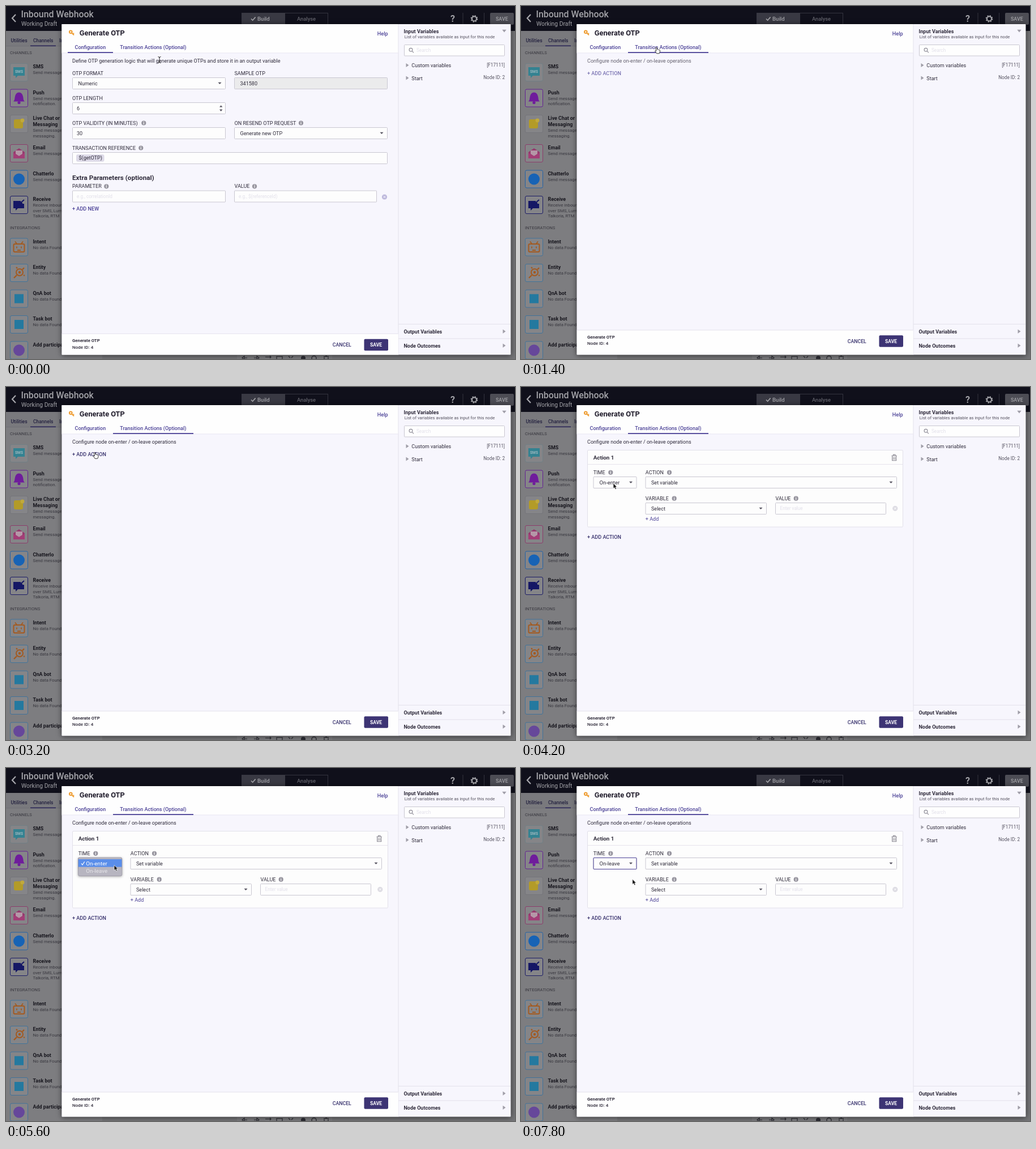
Recreate the animation shown at these times as an HTML page. Size 899x623 px, loop 8000 ms.

```html
<!DOCTYPE html>
<html lang="en">
<head>
<meta charset="utf-8">
<title>Generate OTP</title>
<style>
html, body { margin: 0; width: 100%; height: 100%; overflow: hidden; background: #747477; }
svg { display: block; font-family: Roboto, "Liberation Sans", sans-serif; }
text { white-space: pre; }
</style>
</head>
<body>
<svg id="stage" width="899" height="623" viewBox="0 0 899 623"></svg>
<script>
const INK = '#2f2b3a', PURPLE = '#4a4096', DEEP = '#352f6b', FAINT = '#e2e0ea', EDGE = '#c9c7d1';

const text = (x, y, s, size = 9.05, weight = 400, fill = INK, more = '') =>
  `<text x="${x}" y="${y}" font-size="${size}" font-weight="${weight}" fill="${fill}" ${more}>${s}</text>`;
const rect = (x, y, w, h, fill, stroke = 'none', rx = 0, more = '') =>
  `<rect x="${x}" y="${y}" width="${w}" height="${h}" fill="${fill}" stroke="${stroke}" rx="${rx}" ${more}/>`;
const path = (d, fill = 'none', stroke = 'none', width = 1, more = '') =>
  `<path d="${d}" fill="${fill}" stroke="${stroke}" stroke-width="${width}" ${more}/>`;
const circle = (x, y, r, fill, stroke = 'none', width = 1) =>
  `<circle cx="${x}" cy="${y}" r="${r}" fill="${fill}" stroke="${stroke}" stroke-width="${width}"/>`;
const group = (id, s) => `<g id="${id}">${s}</g>`;
const at = (x, y, s) => `<g transform="translate(${x} ${y})">${s}</g>`;

const info = (x, y) => circle(x, y, 4.1, '#97959f') +
  rect(x - .6, y - .8, 1.2, 3.2, '#fff') + circle(x, y - 2.1, .7, '#fff');
const label = (x, y, s, infoX) => text(x, y, s) + (infoX ? info(infoX, y - 3) : '');
const caret = (x, y) => path(`M${x - 3} ${y - 1.6}h6l-3 3.4z`, '#55525f');
const field = (x, y, w, s, fill = '#fdfdfd') =>
  rect(x + .5, y + .5, w - 1, 20, fill, EDGE, 1) + text(x + 10.5, y + 13.8, s);
const select = (x, y, w, s) => field(x, y, w, s) + caret(x + w - 10.5, y + 10.3);
const hint = (x, y, s) => text(x, y, s, 8.2, 400, FAINT);
const clear = (x, y, fill) => circle(x, y, 4.6, fill) +
  path(`M${x - 1.8} ${y - 1.8}l3.6 3.6m0 -3.6l-3.6 3.6`, 'none', '#fff', 1);

// Sidebar icons are drawn around the centre of their tile.
const glyph = {
  sms: path('M-10 -9h20v15h-12l-4 4v-4h-4z', '#348291') +
    text(0, 1, 'SMS', 6.6, 700, '#9fb9bf', 'text-anchor="middle"'),
  bell: path('M-10 6c3-3 2-6 3-9c1-4 3-7 7-7s6 3 7 7c1 3 0 6 3 9z', '#6f1c9c') + circle(0, 8, 2.6, '#6f1c9c'),
  chat: rect(-9, -8, 16, 16, '#b39b28', 'none', 3) + circle(6, -6, 3.4, '#c0a93c'),
  mail: path('M-10 -2l10-7l10 7v11h-20z', '#963a6e') + path('M-6 -5h12v6l-6 4l-6-4z', '#b597a7') +
    path('M-10 -1l10 6l10-6v10h-20z', '#a33e77'),
  ball: circle(0, 0, 10, '#1763b5'),
  receive: path('M-10 -7h12v5h7v8h-11l-4 4v-4h-4z', '#151765') +
    path('M9 -9l-7 6m0-4v4h4', 'none', '#151765', 2),
  bot: rect(-9.5, -5.5, 19, 14, 'none', '#a35a20', 2, 'stroke-width="2"') +
    path('M-7 -10l3 4m11-4l-3 4M-4 -1v3m8-3v3M-3 5.5h6', 'none', '#a35a20', 1.8),
  entity: circle(1, -1, 6, 'none', '#a35a20', 2) + circle(1, -1, 2.2, '#a35a20') +
    path('M-4 4l-5 5M6 -6l3-3M-3 -8l-2-2M8 4l2 1', 'none', '#a35a20', 2.4),
  block: rect(-8, -8, 16, 16, '#24799f'),
  disc: circle(0, 0, 10, '#66479a')
};

const items = [
  [117, 'sms', '#707f85', ['SMS'], ['Send message']],
  [162.5, 'bell', '#642092', ['Push'], ['Send message', 'notification.']],
  [208, 'chat', '#74747a', ['Live Chat or', 'Messaging'], ['Send message', 'messaging.']],
  [260, 'mail', '#8c3d6b', ['Email'], ['Send message']],
  [305.5, 'ball', '#2362a6', ['Chatterlo'], ['Send message']],
  [351, 'receive', '#1c1d66', ['Receive'], ['Receive inbound', 'over SMS, Lumo', 'Talkoria, RTM']],
  [425.5, 'bot', '#41739a', ['Intent'], ['No data Found']],
  [471, 'entity', '#41739a', ['Entity'], ['No data Found']],
  [516.5, 'block', '#41739a', ['QnA bot'], ['No data Found']],
  [562, 'block', '#41739a', ['Task bot'], ['No data Found']],
  [607.5, 'disc', '#41739a', ['Add participant'], []]
];
const item = ([y, icon, edge, names, notes]) => {
  const top = y - 6.8, below = top + (names.length - 1) * 11;
  return rect(7.5, y - 15.5, 31, 31, '#858588', edge, 2.5) + at(23, y, glyph[icon]) +
    names.map((s, i) => text(47.5, top + i * 11, s, 8.9, 600, '#17161d')).join('') +
    notes.map((s, i) => text(47.5, below + 10 + i * 9.4, s, 7.8, 400, '#38373e')).join('');
};

const backdrop = () => rect(0, 0, 899, 623, '#747477') + rect(0, 44, 170, 579, '#7d7d80') +
  rect(0, 44, 170, 27, '#79797d') + rect(0, 0, 899, 44, '#10101b') +
  path('M17 15l-6 6.5l6 6.5', 'none', '#a6a6ab', 2.2) +
  text(26.5, 19.5, 'Inbound Webhook', 15.9, 500, '#a3a3a8') +
  text(27, 35.2, 'Working Draft', 10.45, 400, '#a3a3a8') +
  rect(416.5, 12.5, 152, 20, 'none', '#34343f') + rect(416, 12, 77, 21, '#393943') +
  path('M433 22.5l2.6 2.7l5-5.6', 'none', '#a3a3a8', 1.6) +
  text(444, 25.8, 'Build', 9.6, 500, '#a3a3a8') + text(514, 25.8, 'Analyse', 9.4, 500, '#62626b') +
  text(785, 28.2, '?', 16, 700, '#a3a3a8') + rect(806.5, 12, 1, 21, '#34343f') + rect(844, 12, 1, 21, '#34343f') +
  circle(827, 22.5, 4, 'none', '#a3a3a8', 2) +
  `<circle cx="827" cy="22.5" r="5.4" fill="none" stroke="#a3a3a8" stroke-width="2" stroke-dasharray="2.24 2"/>` +
  rect(855, 12, 42, 21, '#4d4d55', 'none', 2) + text(865, 25.7, 'SAVE', 8.9, 500, '#a3a3a8') +
  text(8.5, 64, 'Utilities', 8.6, 500, '#23213f') + text(48, 64, 'Channels', 8.5, 500, '#23213f') +
  text(94, 64, 'Integrations', 8.5, 500, '#23213f') +
  rect(0, 70.5, 170, .7, '#6d6d72') + rect(43, 69.5, 45, 1.6, '#2c2758') +
  text(7, 85.4, 'CHANNELS', 7.5, 400, '#38373e') + text(7, 394.4, 'INTEGRATIONS', 7.75, 400, '#38373e') +
  items.map(item).join('') +
  rect(408, 615, 168, 8, '#7b7b7e') +
  path('M417 621l4-3v6zM447 621l-4-3v6zM421 621h5M438 621h5M458 619.5h10m-2-2l2 2l-2 2' +
    'M478 618.5h10v6h-10zM499 618l3 3m5-3l-3 3M561 618.5h9m-6-1h3m-5 2v4h7v-4', 'none', '#2c2c33', 1.2) +
  circle(525, 621.5, 4, '#2c2c33') + circle(544, 621.5, 4, 'none', '#2c2c33', 1.4);

const twisty = (x, y) => path(`M${x} ${y - 3.6}l5 3.6l-5 3.6z`, '#a09ea8');

const modal = () =>
  rect(98.5, 32, 793, 583.5, '#f7f6fd', 'none', 1, 'style="filter:drop-shadow(0 1px 5px #0009)"') +
  rect(98.5, 32, 594.5, 50.5, '#fefefe') + rect(98.5, 82.5, 594.5, 1, '#eceaf3') +
  // key
  circle(114.3, 45.8, 2.3, 'none', '#ee9a2c', 2) + path('M116 47.4l4 4m-1.7-2l1.8-1.6', 'none', '#ee9a2c', 1.8) +
  text(129.8, 52, 'Generate OTP', 12.8, 600, '#231f2e') +
  text(655.8, 52, 'Help', 9.1, 500, PURPLE) +
  text(121.5, 76.2, 'Configuration', 9, 500, PURPLE) +
  text(201.3, 76.2, 'Transition Actions (Optional)', 9.1, 500, PURPLE) +
  rect(109, 81.2, 80, 1.8, PURPLE, 'none', 0, 'id="underline"') +
  // variables panel
  rect(692.5, 32, 1, 583.5, '#e4e2ec') +
  text(702.5, 47.9, 'Input Variables', 9.15, 600) +
  text(703.7, 57.2, 'List of variables available as input for this node', 7.67, 400, '#55525f') +
  path('M876.3 41.8h7.4l-3.7 4.6z', '#a09ea8') +
  rect(703.5, 68.5, 177, 19.5, '#fefefe', EDGE, 1) +
  circle(715, 77.3, 2.9, 'none', '#8d8b96', 1.1) + path('M717.2 79.6l2.8 2.8', 'none', '#8d8b96', 1.2) +
  hint(725, 81.2, 'Search') +
  twisty(706.5, 104.5) + text(716.3, 108.2, 'Custom variables') +
  text(881, 106.8, '[F17111]', 8.2, 400, '#55525f', 'text-anchor="end"') +
  twisty(706.5, 127) + text(716.3, 130.6, 'Start') +
  text(881, 128.8, 'Node ID: 2', 8.2, 400, '#55525f', 'text-anchor="end"') +
  rect(693, 561, 198, 1, '#e4e2ec') + rect(693, 586.5, 198, 1, '#e4e2ec') +
  text(702.5, 577.9, 'Output Variables', 9, 600) + twisty(877.5, 574.3) +
  text(702.5, 603, 'Node Outcomes', 9, 600) + twisty(877.5, 599.3);

const footer = () => rect(98.5, 572, 594.3, 43.5, '#fefefe') + rect(98.5, 571.3, 594.3, 1.2, '#e8e6f0') +
  text(117, 586.6, 'Generate OTP', 7.8, 600) + text(117, 598, 'Node ID: 4', 8, 500) +
  text(576.7, 594.8, 'CANCEL', 8.75, 500, DEEP) +
  rect(632.5, 581.3, 42.5, 20.5, '#3d3474', 'none', 2) + text(643, 594.8, 'SAVE', 8.6, 700, '#fff');

const config = () =>
  text(117, 100.3, 'Define OTP generation logic that will generate unique OTPs and store it in an output variable') +
  label(117, 121.5, 'OTP FORMAT') + select(117, 126, 271, 'Numeric') +
  label(403.5, 121.5, 'SAMPLE OTP') + field(403, 126, 271, '341580', '#ebebec') +
  label(117, 165.5, 'OTP LENGTH') + field(117, 170, 271, '') + text(125, 183.8, '6') +
  path('M377 178.6h5.4l-2.7-3.4zM377 182.6h5.4l-2.7 3.4z', '#55525f') +
  label(117, 209.5, 'OTP VALIDITY (IN MINUTES)', 243.3) + field(117, 214, 271, '') + text(125, 227.8, '30') +
  label(403.5, 209.5, 'ON RESEND OTP REQUEST', 521) + select(403, 214, 271, 'Generate new OTP') +
  label(117, 253.5, 'TRANSACTION REFERENCE', 238.3) + field(117, 258, 557, '') +
  rect(124, 262, 49.5, 12.8, '#dddae8', 'none', 3) + text(128.5, 271.4, '$(getOTP)') +
  text(117, 306.8, 'Extra Parameters (optional)', 11.7, 600) +
  label(117, 321.3, 'PARAMETER', 177.3) + field(117, 325.5, 271, '') + hint(125, 339, 'e.g., correlationId') +
  label(403.5, 321.3, 'VALUE', 439) + field(403, 325.5, 252, '') + hint(411, 339, 'e.g., $(referenceId)') +
  clear(668.5, 337, '#bdb8dc') + text(117, 360.7, '+ ADD NEW', 9.1, 500, PURPLE);

const actions = () =>
  text(117, 100.3, 'Configure node on-enter / on-leave operations') +
  group('add', text(117, 121.6, '+ ADD ACTION', 9.05, 500, 'inherit'));

const card = () => rect(117.5, 111.5, 557, 135.5, '#fdfdfd', '#e2e0ea', 1.5) + rect(118, 136, 556, 1, '#e6e4ec') +
  text(127.7, 128.2, 'Action 1', 9.8, 600) +
  path('M654.5 121.2h9.4M657.5 120.7v-1.5h3.4v1.5M655.7 122v7.8h7v-7.8M657.9 123.5v4.7m2.6-4.7v4.7', 'none', '#85838d', 1.1) +
  label(127.7, 153.8, 'TIME', 158.3) + select(127.5, 158, 77, '') +
  `<text id="when" x="138.5" y="172.3" font-size="9.4" fill="${INK}"></text>` +
  group('focus', rect(128, 158.5, 76, 20, 'none', PURPLE, 1)) +
  label(219.8, 153.8, 'ACTION', 262) + select(219.5, 158, 444.5, 'Set variable') +
  label(219.8, 199.7, 'VARIABLE', 270.7) + select(219.5, 204, 214.5, 'Select') +
  label(449.5, 199.7, 'VALUE', 485.7) + field(449, 204, 196, '') + hint(457.5, 217.4, 'Enter value') +
  clear(660.8, 214.3, '#dddce3') + text(219.8, 236.2, '+ Add', 9.05, 400, PURPLE);

const menu = () => rect(127.5, 158, 77.3, 32.5, '#b7b5c0', '#9896a2', 2.5,
    'stroke-width=".7" style="filter:drop-shadow(0 1.5px 2px #0005)"') +
  rect(127.8, 161, 76.7, 13.6, '#5a8eea', 'none', 0, 'id="hover"') +
  path('M133 168.4l2 2.6l3.7-5.8', 'none', '#fff', 1.2) +
  text(141.3, 171.6, 'On-enter', 9.9, 400, '#fff', 'id="enter"') +
  text(141.3, 185, 'On-leave', 9.9, 400, '#fff', 'id="leave"');

const pointers = () =>
  group('ibeam', path('M-2.5 -5.5q2.5 0 2.5 2v7q0 2-2.5 2M2.5 -5.5q-2.5 0-2.5 2M2.5 5.5q-2.5 0-2.5-2M-1.3 2h2.6', 'none', '#222', 1)) +
  group('hand', path('M-.8 .8q1-1.4 2 0l.6 3q1.3-.6 1.7.5q1.3-.5 1.7.5q1.5-.2 1.6 1.2l-.4 2.8l-1 2.2h-4.6' +
    'q-1.3-2.2-3.1-4.2q.4-1.6 2.4-.1z', '#fff', '#222', .9, 'stroke-linejoin="round"')) +
  group('arrow', path('M0 0v9.2l2.1-1.9l1.5 3.3l1.8-.8l-1.5-3.2h2.8z', '#111', '#fff', .7));

const stage = document.getElementById('stage');
stage.innerHTML = `<clipPath id="frame">${rect(98.5, 32, 793, 583.5, '#000')}</clipPath>` +
  backdrop() + modal() + group('config', config()) +
  group('actions', actions() + group('card', card()) + group('menu', menu())) +
  `<g clip-path="url(#frame)">${group('footer', footer())}</g>` + group('pointer', pointers());

const $ = id => document.getElementById(id);
const set = (id, attrs) => Object.entries(attrs).forEach(([k, v]) => $(id).setAttribute(k, v));
const show = (id, on) => set(id, { display: on ? 'inline' : 'none' });
const move = (id, x, y) => set(id, { transform: `translate(${x} ${y})` });

// time, x, y
const route = [
  [0, 271, 95], [200, 271, 95], [1000, 238.8, 72.8], [1600, 238.8, 72.8], [2400, 156.3, 115.3],
  [3400, 156.3, 115.3], [4200, 163, 170], [4400, 163, 170], [4800, 191, 171.5], [5600, 191, 171.5],
  [6000, 188.5, 178], [7000, 188.5, 178], [7600, 196.8, 196.3], [8000, 196.8, 196.3]
];
function position(t) {
  const i = route.findIndex(p => p[0] > t), [t0, x0, y0] = route[i - 1], [t1, x1, y1] = route[i];
  const u = (t - t0) / (t1 - t0), k = u * u * (3 - 2 * u);
  return [x0 + (x1 - x0) * k, y0 + (y1 - y0) * k];
}

// The old pane fades out after the click, then the new one fades in.
const TAB_CLICK = 1140, FADE = 150, SWAP = TAB_CLICK + FADE;
const ramp = (t, from) => Math.min(1, Math.max(0, (t - from) / FADE));

function draw(now) {
  const t = Math.floor(now % 8000 / 200) * 200;
  const swapped = t >= SWAP, hasCard = t >= 3400, open = t >= 4600 && t < 6800, onLeave = t >= 5800;
  set('underline', t < TAB_CLICK ? { x: 109, width: 80 } : { x: 189, width: 142 });
  set('config', { opacity: 1 - ramp(t, TAB_CLICK) });
  set('actions', { opacity: ramp(t, SWAP) });
  show('config', !swapped);
  show('actions', swapped);
  show('card', hasCard);
  show('menu', open);
  show('focus', t >= 4600);
  move('add', 0, hasCard ? 146.5 : 0);
  set('add', { fill: t < 2200 ? PURPLE : DEEP });
  move('footer', 0, swapped ? 0 : 6.5);
  move('hover', 0, onLeave ? 13.6 : 0);
  set('enter', { opacity: onLeave ? .65 : 1 });
  set('leave', { opacity: onLeave ? 1 : .65 });
  $('when').textContent = t < 6800 ? 'On-enter' : 'On-leave';

  const kind = t < 400 ? 'ibeam' : t < 800 || t >= 1800 && t < 2200 || hasCard ? 'arrow' : 'hand';
  for (const id of ['ibeam', 'hand', 'arrow']) show(id, id === kind);
  move('pointer', ...position(t));
}

const start = performance.now();
function tick() {
  draw(performance.now() - start);
  requestAnimationFrame(tick);
}
tick();
</script>
</body>
</html>
```
